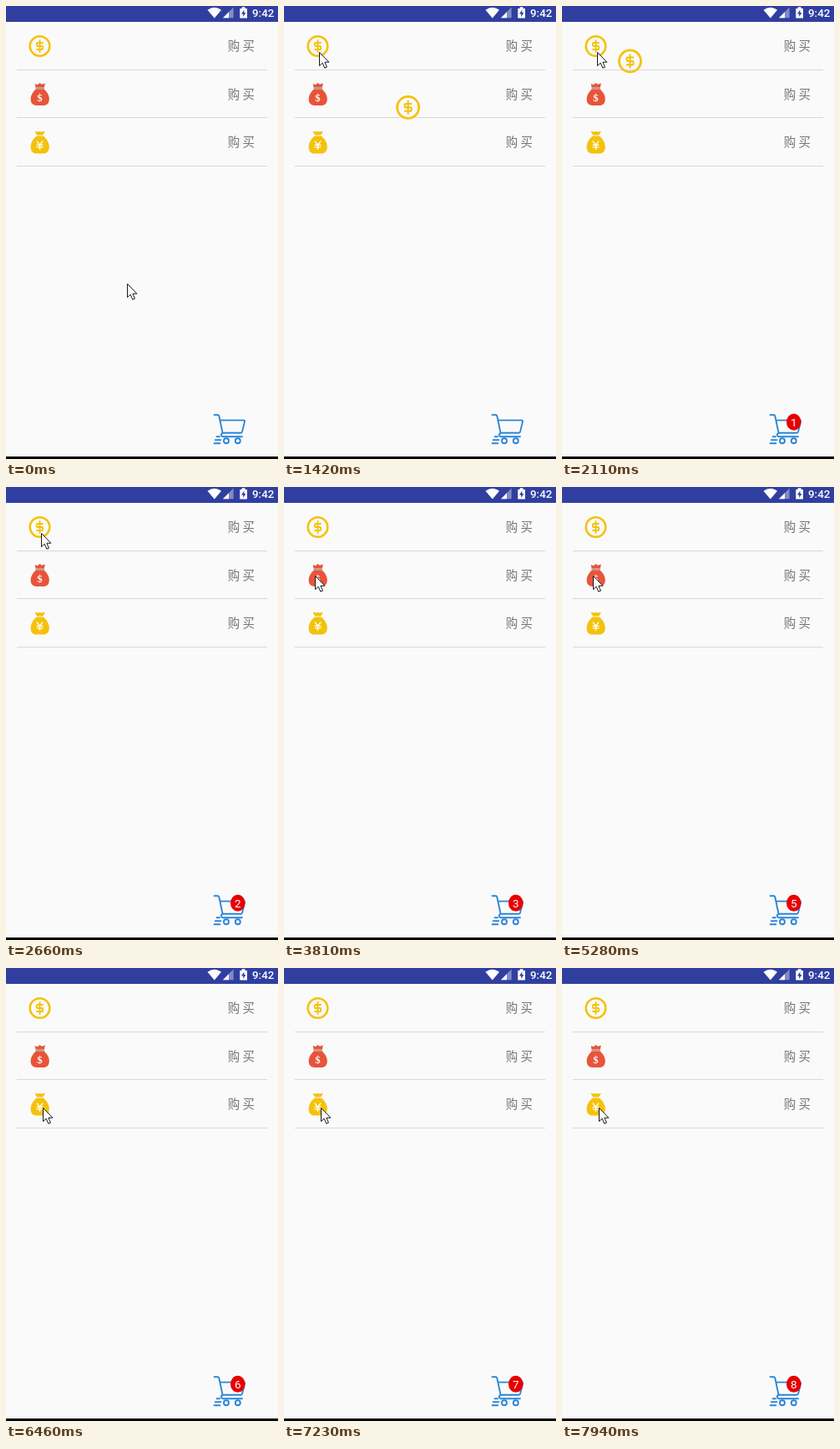
These frames come from a looping animation (326 by 542 pixels, 8000 ms). An HTML page:

```html
<!DOCTYPE html>
<html lang="zh-CN">
<head>
<meta charset="utf-8">
<title>Cart</title>
<style>
  html, body { margin: 0; width: 100%; height: 100%; overflow: hidden; background: #fafafa; }
  svg { display: block; width: 100%; height: 100%; }
  .buy { font: 14.5px "Noto Sans CJK SC", "Noto Sans CJK", sans-serif; fill: #757575; white-space: pre; }
  .clock { font: 500 13.4px Roboto, sans-serif; fill: #fff; }
  .count { font: 13.6px Roboto, sans-serif; fill: #fff; text-anchor: middle; }
  .line { fill: none; stroke-linecap: round; stroke-linejoin: round; }
</style>
</head>
<body>
<svg viewBox="0 0 326 542" xmlns="http://www.w3.org/2000/svg">
  <defs>
    <path id="track"/>
    <g id="coin" class="line" stroke="#f4c20d">
      <circle r="13" stroke-width="2.8"/>
      <path stroke-width="2.1" stroke-linecap="butt" d="M4.6-4.4H-2.8Q-4-4.4-4-3.2V-1.2Q-4 0-2.8 0H2.8Q4 0 4 1.2V3.2Q4 4.4 2.8 4.4H-4.6M0-8.5V8.5"/>
    </g>
    <g id="red">
      <path fill="#e8543a" d="M-6.5-13.6L-3-12.4L0-14.8L2.6-12.8L7-14.2L5.8-8.8H-5.4Z"/>
      <path fill="#b5978a" d="M-5.6-8.8H6V-6.6H-5.6Z"/>
      <path fill="#e8543a" d="M-5-6.6H5.4C9-3.5 12.4 1 12.4 6.2C12.4 12.2 9 14.8 4.5 14.8H-4.2C-9 14.8-12 12-12 6.4C-12 1-8.6-3.5-5-6.6Z"/>
      <text y="9" text-anchor="middle" fill="#fff" font-family="Liberation Serif, serif" font-weight="700" font-size="14">$</text>
    </g>
    <g id="yellow">
      <path fill="#f4c20d" d="M-6.6-13.8Q-4.6-14.8-2.6-13.6Q0-15.2 2.8-13.6Q5-14.8 7-13.8L4-9.4H-3.6Z"/>
      <path fill="#f4c20d" d="M-4-8.2H4.4C8.4-5.2 12.4 0 12.4 6C12.4 12 9 14.8 4.5 14.8H-4.2C-9 14.8-12 12-12 6.2C-12 0-8-5.2-4-8.2Z"/>
      <path class="line" stroke="#fff" stroke-width="1.5" d="M-3.6-1L0 3.6L3.6-1M0 3.6V9.4M-3.8 3.7H3.8M-3.8 6.4H3.8"/>
    </g>
  </defs>

  <rect width="326" height="542" fill="#fafafa"/>
  <rect width="326" height="19" fill="#303f9f"/>
  <rect y="539" width="326" height="3"/>

  <g fill="#fff">
    <path d="M241.5 4.8Q249.8-1.4 258 4.8L249.8 14.4Z"/>
    <path opacity=".4" d="M260 14.3L272.6 1.6V14.3Z"/>
    <path d="M260 14.3L267 7.3V14.3Z"/>
    <path d="M280.3 3H282.6V1.2H286.6V3H289V14.6H280.3Z"/>
    <path fill="#303f9f" d="M285.4 4.6L282 9.6H284.2V13L287.4 8H285.4Z"/>
    <text class="clock" x="295" y="13.2">9:42</text>
  </g>

  <g id="rows"></g>

  <g class="line" stroke="#2b86d9" stroke-width="1.9">
    <path d="M249.6 489.2H253.4Q255 489.2 255.4 490.8L259.6 510.8H281.4Q282.8 510.8 283.1 509.4L286 497.4Q286.4 495.6 284.6 495.6H256.6"/>
    <path d="M259.6 510.8Q257.4 512 258 513.8Q258.4 515.2 260 515.2H283M252.6 515.2H256M250.8 519.2H257.4M249.6 523.2H256.4"/>
    <circle cx="264" cy="520.3" r="3"/>
    <circle cx="277.8" cy="520.3" r="3"/>
  </g>
  <g id="badge">
    <ellipse cx="277.8" cy="497.8" rx="8.8" ry="10" fill="#e60000"/>
    <text id="count" class="count" x="277.8" y="502.6"></text>
  </g>
  <use id="flyer"/>
  <path id="cursor" fill="#fff" stroke="#16161f" stroke-width="1" stroke-linejoin="round" d="M.5.5V16.6L4.2 13.2L6.8 19.2L9.4 18.1L6.9 12.2H11.9Z"/>
</svg>
<script>
  const LOOP = 8000, ROW = 57.5;
  const icons = ['coin', 'red', 'yellow'];
  const el = id => document.getElementById(id);

  el('rows').innerHTML = icons.map((icon, i) => {
    const y = 48 + ROW * i;
    return `<use href="#${icon}" transform="translate(40.5 ${y}) scale(.91)"/>
      <text class="buy" x="265.8" y="${y + 5.2}">购 买</text>
      <rect x="13" y="${[76, 133, 191][i]}" width="300" height="1" fill="#d8d8d8"/>`;
  }).join('');

  // Screen refreshes: first time, last time, number of steps
  const runs = [
    [70, 860, 11], [940, 940, 1], [1240, 1420, 3], [1500, 1880, 6], [2110, 2660, 8],
    [2970, 3730, 11], [3810, 3810, 1], [4050, 4820, 11], [4900, 5280, 6],
    [5510, 6300, 11], [6380, 6460, 2], [6690, 7230, 8], [7390, 7940, 8]
  ];

  // Purchases: row, start, duration
  const flights = [
    [0, 1073, 737], [0, 1963, 645], [0, 2818, 686], [1, 3942, 600],
    [1, 4599, 627], [1, 5382, 640], [2, 6541, 660], [2, 7241, 660]
  ];

  // Pointer moves: start, end, four cubic Bezier points
  const moves = [
    [0, 860, [145, 332], [60, 230], [-50, 100], [42, 57]],
    [860, 940, [42, 57], [42, 56], [42, 56], [42, 55]],
    [3480, 3730, [42, 55], [30, 65], [30, 95], [36, 107]],
    [3730, 3810, [36, 107], [36, 107], [37, 106], [37, 106]],
    [6020, 6300, [37, 106], [28, 125], [28, 160], [42, 181]],
    [6300, 6460, [42, 181], [42, 178], [44, 170], [44, 167]]
  ];

  const clamp = v => Math.min(1, Math.max(0, v));

  function refreshTime(t) {
    const run = runs.filter(r => r[0] <= t).pop();
    if (!run) return 0;
    const [first, last, n] = run;
    if (n === 1) return first;
    const gap = (last - first) / (n - 1);
    return first + gap * Math.min(n - 1, Math.floor((t - first) / gap + 0.001));
  }

  function pointerAt(t) {
    const [start, end, ...pts] = moves.filter(m => m[0] <= t).pop();
    const k = clamp((t - start) / (end - start));
    const u = k * k * (3 - 2 * k), v = 1 - u;
    const w = [v * v * v, 3 * v * v * u, 3 * v * u * u, u * u * u];
    return [0, 1].map(axis => pts.reduce((sum, p, i) => sum + p[axis] * w[i], 0));
  }

  function flightPoint(row, k) {
    const y = 61.5 + ROW * row, track = el('track');
    track.setAttribute('d', `M55 ${y}Q189 ${y} 284.5 500.5`);
    return track.getPointAtLength(track.getTotalLength() * k * k);
  }

  function draw(time) {
    const t = refreshTime(time);
    const [x, y] = pointerAt(t);
    el('cursor').setAttribute('transform', `translate(${x} ${y})`);

    const bought = flights.filter(f => f[1] + f[2] < t).length;
    el('badge').style.display = bought ? '' : 'none';
    el('count').textContent = bought || '';

    // The first moments of a flight fall between two refreshes
    const flight = flights.find(f => t > f[1] && t <= f[1] + f[2]);
    el('flyer').style.display = flight ? '' : 'none';
    if (flight) {
      const [row, start, span] = flight;
      const p = flightPoint(row, (t - start) / span);
      el('flyer').setAttribute('href', '#' + icons[row]);
      el('flyer').setAttribute('transform', `translate(${p.x} ${p.y})`);
    }
  }

  const origin = performance.now();
  function tick() {
    draw((performance.now() - origin) % LOOP);
    requestAnimationFrame(tick);
  }
  tick();
</script>
</body>
</html>
```
